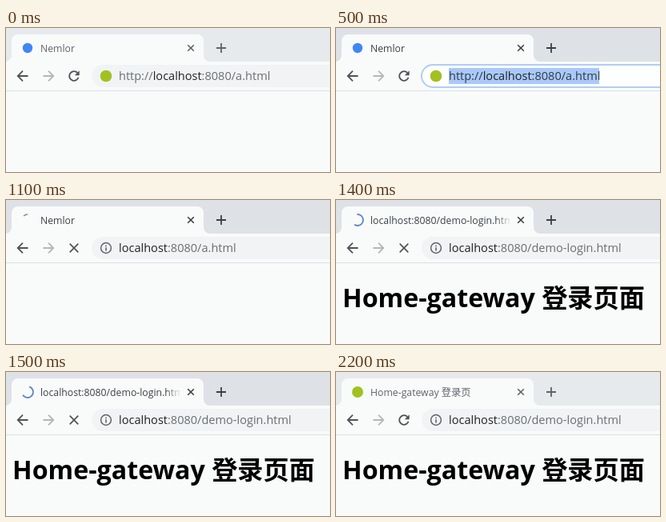
Animation, 405 px wide and 180 px high, one loop 2300 ms. Source, as an HTML page with a canvas:

```html
<!DOCTYPE html>
<html lang="zh">
<head>
<meta charset="utf-8">
<title>Login redirect</title>
<style>
  html, body { margin: 0; width: 100%; height: 100%; overflow: hidden; background: #f9fbfb; }
  canvas { display: block; width: 405px; height: 180px; }
</style>
</head>
<body>
<canvas id="stage"></canvas>
<script>
const W = 405, H = 180, LOOP = 2300, STEP = 100;
const SANS = '"Open Sans", "Noto Sans CJK SC", "Noto Sans CJK", sans-serif';
const PAPER = '#f9fbfb', DARK = '#3c4043', MID = '#5f6368', PALE = '#b4b6b9', INK = '#202124';
const ICON = '#505357', BLUE = '#4285f4', LEAF = '#a2c120';

const canvas = document.getElementById('stage');
const ctx = canvas.getContext('2d');
const dpr = window.devicePixelRatio || 1;
canvas.width = W * dpr;
canvas.height = H * dpr;

const rad = deg => deg * Math.PI / 180;

function text(str, x, y, size, color, weight = 400) {
  ctx.font = `${weight} ${size}px ${SANS}`;
  ctx.fillStyle = color;
  ctx.fillText(str, x, y);
  return x + ctx.measureText(str).width;
}

function lines(color, width, ...paths) {
  ctx.strokeStyle = color;
  ctx.lineWidth = width;
  ctx.beginPath();
  for (const [x, y, ...rest] of paths) {
    ctx.moveTo(x, y);
    for (let i = 0; i < rest.length; i += 2) ctx.lineTo(rest[i], rest[i + 1]);
  }
  ctx.stroke();
}

function arc(x, y, r, from, to, color, width) {
  ctx.strokeStyle = color;
  ctx.lineWidth = width;
  ctx.beginPath();
  ctx.arc(x, y, r, rad(from), rad(to));
  ctx.stroke();
}

function dot(x, y, r, color) {
  ctx.fillStyle = color;
  ctx.beginPath();
  ctx.arc(x, y, r, 0, 2 * Math.PI);
  ctx.fill();
}

function cross(x, y, r, color, width) {
  lines(color, width, [x - r, y - r, x + r, y + r], [x + r, y - r, x - r, y + r]);
}

function arrow(x, y, dir, color) {
  const tip = x + 6.3 * dir;
  lines(color, 1.8, [x - 6.5 * dir, y, tip - dir, y], [x, y - 6.4, tip, y, x, y + 6.4]);
}

function reload(x, y, color) {
  arc(x, y, 5.8, 17, 318, color, 1.8);
  ctx.fillStyle = color;
  ctx.beginPath();
  ctx.moveTo(x + 0.8, y - 0.8);
  ctx.lineTo(x + 6.7, y - 0.8);
  ctx.lineTo(x + 6.7, y - 6.7);
  ctx.fill();
}

function info(x, y) {
  arc(x, y, 6.4, 0, 360, MID, 1.5);
  ctx.fillStyle = MID;
  ctx.fillRect(x - 0.8, y - 3.4, 1.6, 1.6);
  ctx.fillRect(x - 0.8, y - 0.7, 1.6, 4.2);
}

function tabShape() {
  ctx.fillStyle = PAPER;
  ctx.beginPath();
  ctx.moveTo(-1, 42);
  ctx.arcTo(7, 42, 7, 34, 8);
  ctx.arcTo(7, 8, 15, 8, 8);
  ctx.arcTo(247, 8, 247, 16, 8);
  ctx.lineTo(247, 34);
  ctx.arcTo(247, 42, 255, 42, 8);
  ctx.fill();
  ctx.fillRect(0, 42, W, H - 42);
}

function tabTitle(str, color) {
  const fade = ctx.createLinearGradient(200, 0, 219, 0);
  fade.addColorStop(0, color);
  fade.addColorStop(1, PAPER);
  ctx.save();
  ctx.beginPath();
  ctx.rect(43, 10, 175, 30);
  ctx.clip();
  text(str, 43, 30, 12.25, fade);
  ctx.restore();
}

function spinner(t, arrived) {
  if (arrived) {
    const turn = (t - 1400) * 0.23;
    arc(27, 25, 7, -95 + turn, 125 + turn, '#5b86c9', 1.9);
  } else {
    const k = (t - 1100) / STEP;
    arc(27, 25, 7, -135 - 30 * k, -88 - 12 * k, '#8a8d91', 1.6);
  }
}

function omnibox(focused) {
  ctx.beginPath();
  ctx.roundRect(107, 46, 340, 28, 14);
  ctx.fillStyle = focused ? '#fdfefe' : '#f1f3f4';
  ctx.fill();
  if (focused) {
    ctx.strokeStyle = '#afcdf6';
    ctx.lineWidth = 2;
    ctx.stroke();
  }
}

function address(scheme, path, selected) {
  const dim = selected ? '#303a48' : '#6a6e72';
  if (selected) {
    ctx.fillStyle = '#a9c9f8';
    ctx.fillRect(141, 50, 188, 20);
  }
  let x = text(scheme, 141, 65, 14.55, dim);
  x = text('localhost', x, 65, 14.55, INK);
  return text(':8080/' + path, x, 65, 14.55, dim);
}

function draw(t) {
  const active = t >= 400 && t < 2200;
  const focused = t >= 400 && t < 1100;
  const selected = t >= 500 && t < 1100;
  const sent = t >= 1100;
  const arrived = t >= 1400;
  const loading = sent && t < 1600;
  const tone = active ? DARK : MID;

  ctx.setTransform(dpr, 0, 0, dpr, 0, 0);
  ctx.fillStyle = active ? '#dee1e6' : '#e7eaed';
  ctx.fillRect(0, 0, W, H);
  tabShape();

  // Tab strip
  if (loading) spinner(t, arrived);
  else if (sent) dot(27, 25, 7, LEAF);
  else dot(27, 25, 6.2, BLUE);
  const title = !arrived ? 'Nemlor'
    : loading ? 'localhost:8080/demo-login.html' : 'Home-gateway 登录页';
  tabTitle(title, tone);
  cross(231, 25, 3.8, tone, 1.6);
  lines(tone, 1.8, [263, 25, 275, 25], [269, 19, 269, 31]);

  // Toolbar
  arrow(21, 60, -1, ICON);
  arrow(53, 60, 1, PALE);
  if (loading) cross(85, 60, 5.3, ICON, 1.7);
  else reload(85, 60, ICON);
  omnibox(focused);
  if (sent) info(125, 60);
  else dot(125, 60, 7.3, LEAF);
  const end = address(sent ? '' : 'http://', arrived ? 'demo-login.html' : 'a.html', selected);
  if (focused && !selected) {
    ctx.fillStyle = INK;
    ctx.fillRect(Math.round(end), 52, 1, 17);
  }
  ctx.fillStyle = '#dcdfe2';
  ctx.fillRect(0, 78, W, 1);

  // Page
  if (arrived) text('Home-gateway 登录页面', 8, 134, 32.2, '#000', 700);
}

function tick() {
  const t = performance.now() % LOOP;
  draw(Math.floor(t / STEP) * STEP);
  requestAnimationFrame(tick);
}
tick();
</script>
</body>
</html>
```
